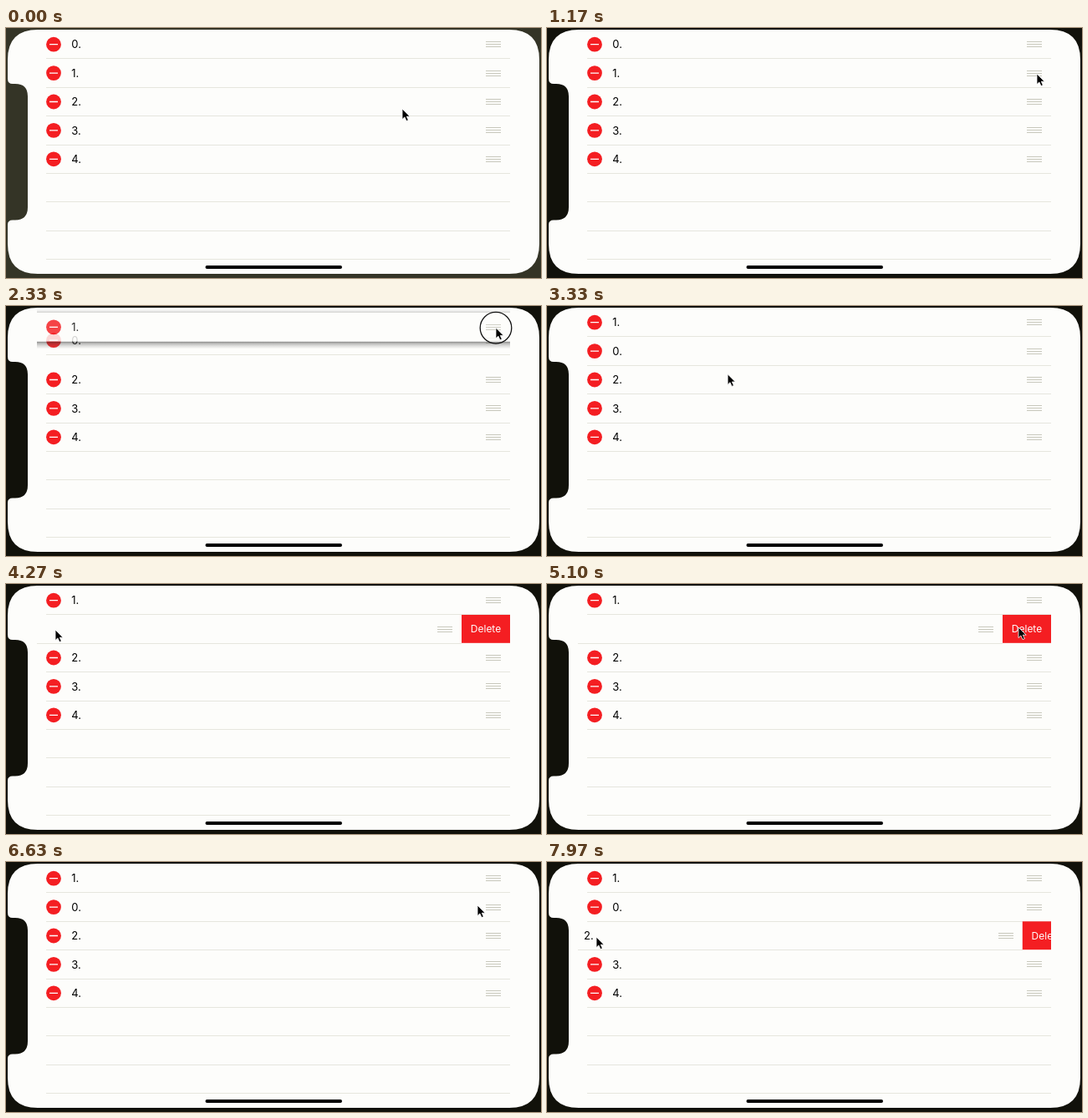
These frames come from a looping animation (640 px wide and 300 px high, 8000 ms). An HTML page:

```html
<!DOCTYPE html>
<html lang="en">
<head>
<meta charset="utf-8">
<title>Editable list</title>
<style>
  html, body { margin: 0; width: 100%; height: 100%; overflow: hidden; }
  svg { display: block; width: 100vw; height: 100vh; }
  text { font-family: Inter, Roboto, "Liberation Sans", sans-serif; }
  .paper { fill: #fdfdfb; }
  .line { stroke: #e6e6de; shape-rendering: crispEdges; }
  .grip { stroke: #c8c8bc; shape-rendering: crispEdges; }
  .red { fill: #f41e22; }
</style>
</head>
<body>
<svg viewBox="0 0 640 300">
  <defs>
    <clipPath id="list"><rect x="37" y="-20" width="566" height="340"/></clipPath>
    <clipPath id="screenClip"><use href="#screen"/></clipPath>
    <linearGradient id="below" x2="0" y2="1">
      <stop stop-color="#222" stop-opacity=".7"/>
      <stop offset=".25" stop-color="#444" stop-opacity=".45"/>
      <stop offset="1" stop-color="#888" stop-opacity="0"/>
    </linearGradient>
    <linearGradient id="above" x2="0" y2="1">
      <stop stop-color="#888" stop-opacity="0"/>
      <stop offset="1" stop-color="#888" stop-opacity=".45"/>
    </linearGradient>
    <path id="screen" d="M38 2H602Q638 2 638 38V259Q638 295 602 295H38Q2 295 2 259V236
      Q2 230.500 8 230.500H11Q26 230.500 26 215V82Q26 67 11 67H8Q2 67 2 61V38Q2 2 38 2Z"/>
  </defs>
  <rect id="frame" width="640" height="300"/>
  <use href="#screen" class="paper"/>
  <g clip-path="url(#screenClip)">
    <g id="lines"></g>
    <g id="rows" clip-path="url(#list)"></g>
  </g>
  <rect x="238.500" y="285" width="163.500" height="4" rx="2"/>
  <g id="cursor">
    <circle id="press" r="18.800" fill="none" stroke="#111" stroke-width="1.300"/>
    <path d="M0 0V12.600L2.900 9.900L5 14.600L7.300 13.600L5.300 9.200H9.200Z" stroke="#fff" stroke-width=".8"/>
  </g>
</svg>
<script>
const LOOP = 8000, PITCH = 34.4, HALF = PITCH / 2, OPEN = 58;
const PICK_UP = 1700, DROP = 2800;
const rowY = slot => 19.7 + PITCH * slot;
const $ = id => document.getElementById(id);
const mix = (a, b, p) => a + (b - a) * p;

// Eased progress from 0 to 1.
function ramp(t, start, duration) {
  const p = Math.min(1, Math.max(0, (t - start) / duration));
  return p * p * (3 - 2 * p);
}

const home = { x: 474, y: 97 };
const grip = { x: 586, y: 55 };
const moves = [
  { at: 100, lasts: 750, to: grip },
  { at: 1790, lasts: 770, to: { x: 586, y: 18.5 } },
  { at: 3130, lasts: 315, to: { x: 59, y: 55 }, sag: 45 },
  { at: 4350, lasts: 430, to: { x: 582, y: 56 }, sag: 10 },
  { at: 4800, lasts: 290, to: { x: 564, y: 52 } },
  { at: 7080, lasts: 440, to: { x: 59, y: 90 }, sag: 10 }
];

function pointerAt(t) {
  let { x, y } = home;
  for (const { at, lasts, to, sag = 0 } of moves) {
    const p = ramp(t, at, lasts);
    x = mix(x, to.x, p);
    y = mix(y, to.y, p) + sag * 4 * p * (1 - p);
  }
  return { x, y };
}

const pressed = t => t >= 1550 && t < DROP ||
  [3700, 5430, 7640].some(start => t >= start && t < start + 165);

const lineAt = y => `<path class="line" d="M48 ${y}H603"/>`;
$("lines").innerHTML = [5, 6, 7].map(i => lineAt(rowY(i) + HALF)).join("");

function makeRow(label) {
  const row = document.createElementNS("http://www.w3.org/2000/svg", "g");
  row.innerHTML = `
    <g class="lifted">
      <rect x="37" y="${-HALF - 4}" width="566" height="4" fill="url(#above)"/>
      <rect x="37" y="${HALF}" width="566" height="9" fill="url(#below)"/>
      <rect class="paper" x="37" y="${-HALF}" width="566" height="${PITCH}"/>
    </g>
    <g class="content">
      ${lineAt(HALF)}
      <circle class="red" cx="57" r="8.900"/>
      <path d="M52 0H62" stroke="#fff" stroke-width="1.300"/>
      <text x="78.300" y="4.700" font-size="13">${label}.</text>
      <path class="grip" d="M574 -3H592M574 0H592M574 3H592"/>
      <rect class="red" x="603" y="${-HALF}" width="${OPEN}" height="${PITCH - .5}"/>
      <text x="632" y="4.300" font-size="12" fill="#fff" text-anchor="middle">Delete</text>
    </g>`;
  $("rows").append(row);
  const lifted = row.querySelector(".lifted");
  const line = row.querySelector(".line");
  const content = row.querySelector(".content");
  return (y, shift = 0, lift = 0) => {
    row.setAttribute("transform", `translate(0 ${y})`);
    row.setAttribute("opacity", 1 - .17 * lift);
    lifted.setAttribute("opacity", lift);
    line.setAttribute("opacity", 1 - lift);
    content.setAttribute("transform", `translate(${-shift} 0)`);
  };
}

// The dragged row comes last so that it covers the others.
const place = {};
for (const label of [0, 2, 3, 4, 1]) place[label] = makeRow(label);

function render(t) {
  const { x, y } = pointerAt(t);
  $("cursor").setAttribute("transform", `translate(${x} ${y})`);
  $("press").setAttribute("opacity", pressed(t) ? 1 : 0);
  $("frame").setAttribute("fill", t < 870 ? "#343426" : "#11110a");

  const dropped = ramp(t, DROP, 130);
  const lift = ramp(t, PICK_UP, 150) - dropped;
  const dragged = t < PICK_UP ? rowY(1) : rowY(1) + y - grip.y;
  place[1](mix(dragged, rowY(0), dropped), 0, lift);

  const firstOpen = ramp(t, 3950, 216) - ramp(t, 5620, 430);
  place[0](rowY(ramp(t, 2220, 190)), OPEN * firstOpen);
  place[2](rowY(2), OPEN * ramp(t, 7850, 216));
  place[3](rowY(3));
  place[4](rowY(4));
}

const start = performance.now();
function tick() {
  render((performance.now() - start) % LOOP);
  requestAnimationFrame(tick);
}
tick();
</script>
</body>
</html>
```
